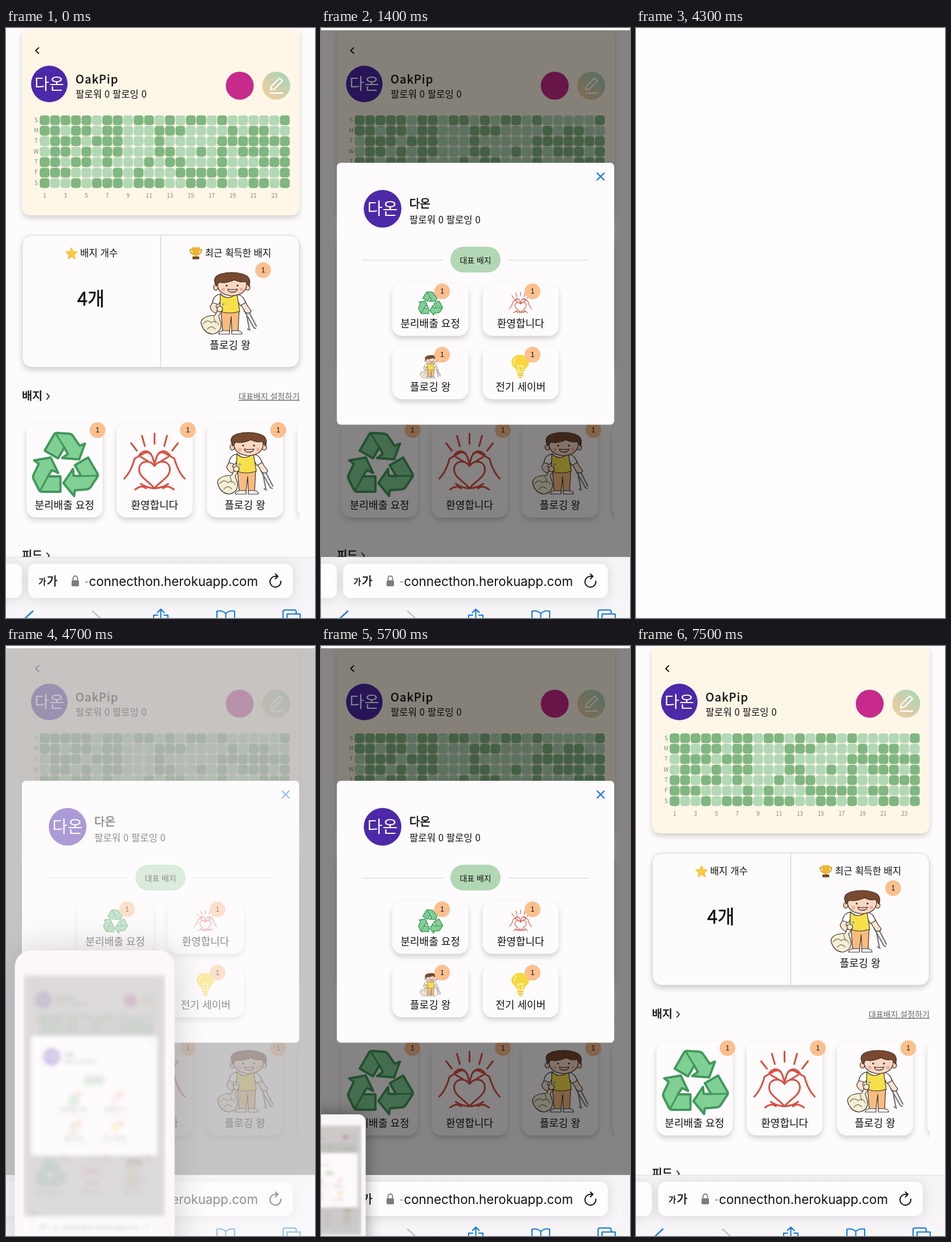
An HTML page for the animation above (7600 ms loop, 542 px wide and 1033 px high).

```html
<!DOCTYPE html>
<html lang="ko">
<head>
<meta charset="utf-8">
<title>Badges</title>
<style>
html, body { margin: 0; width: 100%; height: 100%; overflow: hidden; background: #fefbfc; }
svg { display: block; font-family: "Noto Sans CJK KR", "Noto Sans CJK JP", "Noto Sans CJK", sans-serif; }
.shadow { filter: drop-shadow(0 5px 5px rgba(0, 0, 0, .17)); }
.field { filter: drop-shadow(0 2px 10px rgba(0, 0, 0, .12)); }
.medium { stroke: #111; stroke-width: .55; }
.line { fill: none; stroke-linecap: round; stroke-linejoin: round; }
.ink { stroke: #3a302c; stroke-width: 1.2; stroke-linejoin: round; }
</style>
</head>
<body>
<svg id="stage" width="542" height="1033" viewBox="0 0 542 1033"></svg>
<script>
const PAPER = '#fefbfc', BLUE = '#1478e4', MEDIUM = 'class="medium"';

const text = (x, y, size, str, attrs = '') =>
  `<text x="${x}" y="${y}" font-size="${size}" fill="#111" ${attrs}>${str}</text>`;
const mid = (x, y, size, str, attrs = '') => text(x, y, size, str, 'text-anchor="middle" ' + attrs);
const rect = (x, y, w, h, r, fill, attrs = '') =>
  `<rect x="${x}" y="${y}" width="${w}" height="${h}" rx="${r}" fill="${fill}" ${attrs}/>`;
const circle = (x, y, r, fill) => `<circle cx="${x}" cy="${y}" r="${r}" fill="${fill}"/>`;
const line = (d, color, width, attrs = '') =>
  `<path class="line" d="${d}" stroke="${color}" stroke-width="${width}" ${attrs}/>`;
const at = (x, y, s, body) => `<g transform="translate(${x} ${y}) scale(${s})">${body}</g>`;

const count = (x, y) => circle(x, y, 13.8, '#fcbf8e') +
  mid(x, y + 4, 12, '1', 'font-family="Liberation Sans, sans-serif"');
const avatar = (x, y, r) => circle(x, y, r, '#4b29a9') + mid(x, y + r * .31, r * .88, '다온', 'style="fill:#fff"');
const followers = (x, y) => text(x, y, 16.7, '팔로워 0 팔로잉 0');

// Badge pictures, each drawn around its own centre
const arrow = 'M-7 44V17H-29L-22 6-11 11-24-16-53-11-45-5-54 14Q-56 18-54 22L-45 40Q-43 44-39 44Z';
const recycle = at(0, 5, 1, [0, 120, 240].map(a =>
  `<path d="${arrow}" transform="rotate(${a})" fill="#80d095" stroke="#40985a" stroke-width="4" stroke-linejoin="round"/>` +
  line('M-43 43L-29 17', '#40985a', 3, `transform="rotate(${a})"`)).join(''));

const heart = line(
  'M0-53V-35M-22-49L-17-31M22-49L17-31M-41-36L-31-23M41-36L31-23' +
  [-1, 1].map(s => {
    const p = (x, y) => `${x * s} ${y} `;
    return 'M' + p(0, 4) + 'C' + p(7, -8) + p(27, -6) + p(27, 10) + 'C' + p(27, 24) + p(9, 31) + p(0, 43) +
      'M' + p(0, 0) + 'L' + p(4, -13) + 'Q' + p(10, -24) + p(19, -18) + 'L' + p(35, -9) + 'Q' + p(41, 14) + p(53, 26) +
      'M' + p(6, -17) + 'Q' + p(17, -28) + p(27, -15) +
      'M' + p(12, -5) + 'L' + p(24, -12) +
      'M' + p(0, 43) + 'Q' + p(15, 42) + p(24, 35) + 'M' + p(15, 43) + 'Q' + p(22, 36) + p(34, 45);
  }).join(''), '#d94f40', 3);

const boy = at(-50, -55, 1,
  line('M78 68L95 98M84 66L99 95M81 70L87 101M95 98l3 1M84 100l4 2', '#777b80', 2.3) +
  `<path class="ink" fill="#f9bc7e" d="M37 66H69L67 104H56L55 78 52 104H40Z"/>
  <path class="ink" fill="#fff" d="M40 103h12v6H33q0-4 7-6zM56 103h11q7 1 7 6H56z"/>
  <path class="ink" fill="#fde3cf" d="M25 49L18 61Q19 69 29 73L36 71 34 64 28 61 34 51zM68 51L80 71Q88 75 90 68L84 60 76 45z"/>
  <path class="ink" fill="#fff" d="M35 39Q24 41 22 54L33 57 39 46zM66 39Q77 42 80 54L71 59 65 48z"/>
  <path class="ink" fill="#f8e04a" d="M36 38Q42 45 49 45T65 38L70 69Q53 75 35 69Z"/>` +
  circle(41, 57, 2.2, '#8fa8c4') +
  `<path class="ink" fill="#f3eed6" d="M31 67L27 76Q3 77 2 89 6 107 22 109 39 106 37 90L33 77 39 69Z"/>` +
  line('M6 91q7-9 14-2q8-7 13 4M13 101q6-9 14-1M24 77l3 12', '#857c5c', 1.3) +
  `<ellipse class="ink" cx="35" cy="65" rx="5" ry="5" fill="#fde3cf"/>
  <ellipse class="ink" cx="28" cy="27" rx="4" ry="5" fill="#f8cdb4"/><ellipse class="ink" cx="84" cy="27" rx="4" ry="5" fill="#f8cdb4"/>
  <path class="ink" fill="#f9d8c2" d="M31 18Q29 39 56 42 84 40 82 18Q56 6 31 18Z"/>
  <path class="ink" fill="#7a4930" d="M29 25Q16 2 56 1 95 2 86 25L80 17Q70 19 61 14 44 21 34 18Z"/>` +
  circle(47, 24, 1.6, '#222') + circle(66, 24, 1.6, '#222') +
  circle(41, 31, 3.2, '#f4aea4') + circle(73, 31, 3.2, '#f4aea4') +
  '<path class="ink" fill="#e08a80" d="M49 30Q57 32 66 30 64 36 57 36T49 30Z"/><path fill="#fff" d="M51 31.4Q57 33 64 31.4L63 33.5H52Z"/>');

const bulb = '<path fill="#f8d83c" d="M-16 24Q-18 14-30 4C-58-22-36-56-2-56S56-22 28 4Q17 14 15 24Z"/>' +
  rect(-16, 28, 31, 7, 3, '#f1c92f') + rect(-14, 38, 27, 7, 3, '#f1c92f') + rect(-8, 48, 15, 7, 3, '#f1c92f') +
  line('M-20-40Q-34-30-29-14M-8 22L-12-6-4-1 2-7 8-1 13-6 7 22', '#fff6c0', 4);

const star = Array.from({ length: 10 }, (_, i) => {
  const a = i * Math.PI / 5 - Math.PI / 2, r = i % 2 ? 5 : 11;
  return `${115 + r * Math.cos(a)},${395.5 + r * Math.sin(a)}`;
}).join(' ');
const trophy = line('M327 388h-4q0 8 8 9M339 388h4q0 8-8 9', '#d99a1e', 2) +
  '<path fill="#eeb52d" d="M326 384H340Q340 397 335 399V402H331V399Q326 397 326 384Z"/>' +
  rect(327, 400, 12, 5, 1, '#7a4a21');

// Activity grid
const activity = [
  '#####.##.##.#.##.#.....#',
  '##.##.##...###....#.##..',
  '.###.###...#.....#######',
  '.##.#.##...##..#.#.###.#',
  '##.##.#...#.##...#...###',
  '###....#.#...#####.##..#',
  '#..#.###.###..##.#..##.#'];
const grid = activity.map((row, j) => {
  const y = 161.5 + j * 18.35;
  return mid(53, y + 3, 10, 'SMTWTFS'[j], 'style="fill:#85827a"') +
    [...row].map((c, i) => rect(59.1 + i * 18.32, y - 8.6, 17.2, 17.2, 5, c === '#' ? '#80b681' : '#b2d8b6')).join('');
}).join('') + Array.from({ length: 12 }, (_, i) =>
  mid(67.7 + i * 36.64, 296.5, 10, i * 2 + 1, 'style="fill:#85827a"')).join('');

const header = `<path class="shadow" fill="#fef7e7" d="M28 4H515V312Q515 328 499 328H44Q28 328 28 312Z"/>` +
  line('M57.5 34.5L52 39.5 57.5 44.5', '#111', 1.8) + avatar(76, 98, 32) +
  text(122, 97, 20, 'OakPip', MEDIUM + ' letter-spacing="1.3"') + followers(122, 122) +
  circle(410, 101, 24.5, '#c62a8b') + circle(474, 101, 24.5, 'url(#edit)') +
  line('M464 114H485M464 108L465.5 102 480 87.5 485 92.5 470.5 107Z', '#fff', 2.4) + grid;

const summary = rect(28.5, 362.5, 486, 231.5, 17, PAPER, 'class="shadow" stroke="#d2d1d5"') +
  line('M271.5 363V593', '#d2d1d5', 1.2) +
  `<polygon points="${star}" fill="#fbc93a" stroke="#f3b62c" stroke-linejoin="round"/>` +
  text(130, 400, 16.7, '배지 개수') + mid(149, 486, 32.5, '4개', MEDIUM) +
  trophy + text(349, 400, 16.6, '최근 획득한 배지') +
  at(390, 482, 1, boy) + count(451, 424) + mid(393, 562, 18, '플로깅 왕');

const tile = (x, y, h, label, icon, scale, iconY) =>
  rect(x, y, 133.5, h, 17, PAPER, 'class="shadow"') +
  at(x + 66.5, iconY, scale, icon) + mid(x + 66.7, y + h - 15, 18, label);

const list = text(28, 651, 19.6, '배지', MEDIUM) + line('M71.5 640L76 645 71.5 650', '#111', 1.6) +
  text(515, 650, 14, '대표배지 설정하기', 'text-anchor="end" text-decoration="underline" style="fill:#666"') +
  '<g clip-path="url(#row)">' +
  tile(36, 692, 165, '분리배출 요정', recycle, 1, 763) +
  tile(194, 692, 165, '환영합니다', heart, 1, 763) +
  tile(352.5, 692, 165, '플로깅 왕', boy, 1, 762) +
  rect(511, 692, 133, 165, 17, PAPER, 'class="shadow"') + '</g>' +
  count(160.5, 704) + count(319, 704) + count(477.5, 704) +
  text(28, 930, 19.6, '피드', MEDIUM) + line('M71.5 919L76 924 71.5 929', '#111', 1.6);

const modal = rect(0, 4, 542, 922, 0, '#000', 'opacity=".48"') +
  rect(27.8, 236, 486.5, 458.5, 7, PAPER) +
  rect(475, 244, 31.5, 36, 3, '#c9c7cb', 'id="press"') +
  line('M484.5 254L496.5 266M496.5 254L484.5 266', BLUE, 2.2) +
  avatar(108, 316.5, 33) + text(155, 315, 20, '다온', MEDIUM) + followers(155, 341.5) +
  line('M73 406.5H213M329 406.5H469', '#dddce0', 1.5) +
  rect(227, 383, 88, 45, 22.5, '#b2d7b5') + mid(271, 411.5, 13.9, '대표 배지') +
  tile(125, 447, 92, '분리배출 요정', recycle, .37, 482) +
  tile(283.5, 447, 92, '환영합니다', heart, .37, 482) +
  tile(125, 558, 92, '플로깅 왕', boy, .37, 593) +
  tile(283.5, 558, 92, '전기 세이버', bulb, .37, 593) +
  count(212.5, 461) + count(371, 461) + count(212.5, 572) + count(371, 572);

const bar = rect(0, 926, 542, 108, 0, 'url(#bar)') + line('M0 926.5H542', '#000', 1, 'opacity=".08"') +
  rect(-40, 938, 68, 60, 13, '#fffdfe', 'class="field"') + rect(39, 938, 464, 60, 13, '#fffdfe', 'class="field"') +
  text(57, 975, 14.5, '가', MEDIUM) + text(71.5, 975.5, 20.5, '가', MEDIUM) +
  rect(115, 967, 13, 10.5, 2, '#7b7b80') + line('M117.5 967V963.5a4 4 0 0 1 8 0V967', '#7b7b80', 1.8) +
  line('M139.5 970H143', '#999', 1.8) +
  text(442, 977, 22.3, 'connecthon.herokuapp.com', 'text-anchor="end" font-family="Inter, sans-serif"') +
  line('M482 968.5A9.5 9.5 0 1 1 473 960H476M472.5 956L477 960 472.5 964.5', '#111', 1.9) +
  line('M47 1021L33 1034 47 1047', BLUE, 2.4) + line('M152 1021L166 1034 152 1047', '#c2c1c6', 2.4) +
  line('M266 1028H259V1050H284V1028H277M271.5 1040V1018M265.5 1023.5L271.5 1017.5 277.5 1023.5', BLUE, 2.1) +
  line('M385.5 1025Q379 1019 370 1021V1045M385.5 1025Q392 1019 401 1021V1045M385.5 1025V1045', BLUE, 2.1) +
  line('M493 1026H516V1048H493ZM486 1040V1022Q486 1019 489 1019H506Q509 1019 509 1022V1026', BLUE, 2.1);

const SHRINK = .207;
const thumb = rect(0, 0, 127, 275, 13, '#f6f2f4') +
  `<g clip-path="url(#shot)"><g id="soft">${at(7, 19, SHRINK, '<use href="#page"/>')}</g></g>` +
  rect(0, 0, 127, 275, 13, '#fefbfc', 'id="wash"');

const stage = document.getElementById('stage');
stage.innerHTML = `<defs>
  <linearGradient id="edit" x1="0" y1="1" x2="1" y2="0"><stop offset=".1" stop-color="#f3cba0"/><stop offset=".9" stop-color="#a9d5b7"/></linearGradient>
  <linearGradient id="bar" x1="0" y1="0" x2="0" y2="1"><stop stop-color="#f5f3f5"/><stop offset="1" stop-color="#f7f5f7"/></linearGradient>
  <clipPath id="row"><rect x="28" y="680" width="487" height="200"/></clipPath>
  <clipPath id="shot"><rect x="7" y="10" width="113" height="256" rx="7"/></clipPath>
  </defs>
  <g id="page">${rect(0, 0, 542, 1033, 0, PAPER)}${header}${summary}${list}<g id="modal">${modal}</g>${bar}</g>
  <g id="thumb" style="filter:drop-shadow(0 0 14px rgba(0,0,0,.4))">${thumb}</g>
  ${rect(0, 0, 542, 1033, 0, '#fefcfd', 'id="flash"')}`;

const el = id => document.getElementById(id);
const ramp = (t, a, b) => Math.min(1, Math.max(0, (t - a) / (b - a)));
const ease = p => 1 - (1 - p) ** 3;
const mix = (a, b, p) => a + (b - a) * p;
const show = (id, on) => el(id).style.display = on ? '' : 'none';

function draw(t) {
  const open = ramp(t, 750, 950) * (1 - ramp(t, 6690, 6790));
  el('modal').style.opacity = open;
  show('modal', open > 0);
  show('press', t >= 6550);

  const flash = ramp(t, 4080, 4280) * (1 - ramp(t, 4490, 4950));
  el('flash').style.opacity = flash;
  show('flash', flash > 0);

  const p = ease(ramp(t, 4490, 5150)), away = ramp(t, 5450, 5850) ** 2;
  const s = mix(1 / SHRINK, 1, p);
  show('thumb', t >= 4300 && t < 5850);
  el('thumb').setAttribute('transform',
    `translate(${mix(-7 / SHRINK, 38, p) - 220 * away} ${mix(-19 / SHRINK, 820, p)}) scale(${s})`);
  el('soft').style.filter = `blur(${2.6 * p}px)`;
  el('wash').style.opacity = .6 * p;
}

function tick() {
  draw(performance.now() % 7600);
  requestAnimationFrame(tick);
}
tick();
</script>
</body>
</html>
```
